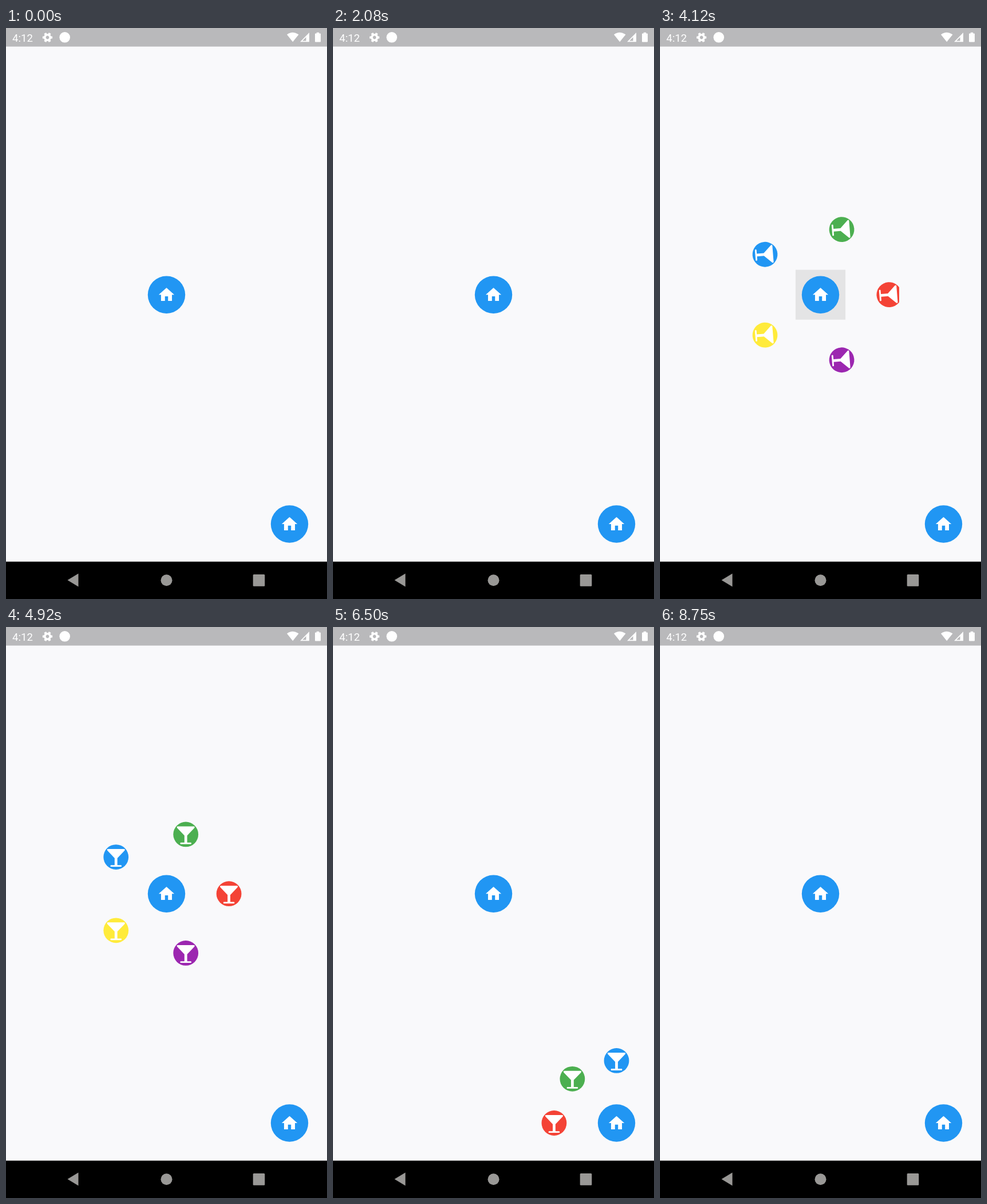
These frames come from a looping animation (561 by 998 pixels, 8790 ms). An HTML page:

```html
<!DOCTYPE html>
<html lang="en">
<head>
<meta charset="utf-8">
<title>Radial menus</title>
<style>
html, body { margin: 0; width: 100%; height: 100%; overflow: hidden; background: #f9f9fb; }
svg { display: block; width: 561px; height: 998px; }
text { font: 18.6px Roboto, Arial, sans-serif; fill: #fff; }
</style>
</head>
<body>
<svg viewBox="0 0 561 998">
  <defs>
    <clipPath id="box"><rect x="-137.5" y="-137.5" width="275" height="275"/></clipPath>
    <path id="house" fill="#fff" transform="scale(1.364) translate(-12 -12)" d="M10 20v-6h4v6h5v-8h3L12 3 2 12h3v8z"/>
    <path id="glass" fill="#fff" d="M-14.8-14H14.8Q16.4-13 15-11.2L2.4 2V14.2H9.2Q10.6 15.6 9.2 17H-9.2Q-10.6 15.6-9.2 14.2H-2.4V2L-15-11.2Q-16.4-13-14.8-14Z"/>
    <rect id="tooth" x="-2.1" y="-8.6" width="4.2" height="5" rx=".6"/>
  </defs>
  <rect width="561" height="998" fill="#f9f9fb"/>
  <g id="menus"></g>

  <rect width="561" height="32.5" fill="#b9b9bb"/>
  <text x="11" y="23.5">4:12</text>
  <g fill="#fff">
    <g id="gear" transform="translate(72.5 16.5)">
      <circle r="4.7" fill="none" stroke="#fff" stroke-width="3.6"/>
    </g>
    <circle cx="102.7" cy="16.3" r="9.3"/>
    <path d="M491 11.5Q501 4 511.5 11.5L501.200 24.300Z"/>
    <path fill-rule="evenodd" d="M514 24.300L530 8V24.300ZM518 22.600H524.500V16Z"/>
    <path d="M540 10.500Q540 9.500 541 9.500H542.800V7.800H547.200V9.500H549Q550 9.500 550 10.500V23.500Q550 24.500 549 24.500H541Q540 24.500 540 23.500Z"/>
  </g>

  <rect y="932.7" width="561" height="65.300"/>
  <g fill="#999896">
    <path d="M107.500 965L126.500 953.500V976.500Z"/>
    <circle cx="280.500" cy="965.300" r="10"/>
    <rect x="431.700" y="955" width="20.600" height="20.800" rx="1.500"/>
  </g>
</svg>
<script>
const LOOP = 8790, SPAN = 500, RADIUS = 109.1;
const RED = '#f44336', GREEN = '#4caf50', BLUE = '#2196f3', YELLOW = '#ffeb3b', PURPLE = '#9c27b0';

// press rows: fade-in start, fade-in end, fade-out start, fade-out end, strength
const menus = [
  { x: 280.5, y: 466.2, clip: true, open: 4064, close: 5290,
    items: [[RED, 0], [PURPLE, 72], [YELLOW, 144], [BLUE, 216], [GREEN, 288]],
    press: [[3940, 4060, 4190, 4390, .085], [5040, 5120, 5330, 5530, .065]] },
  { x: 495.5, y: 867, clip: false, open: 5920, close: 7250,
    items: [[RED, 180], [GREEN, 225], [BLUE, 270]],
    press: [[5740, 5860, 6040, 6240, .08], [7000, 7080, 7330, 7530, .065]] }
];

const clamp = v => Math.min(1, Math.max(0, v));
const elasticOut = t => t <= 0 ? 0 : t >= 1 ? 1 :
  1 + 2 ** (-10 * t) * Math.sin((t - .1) * Math.PI * 5);
const decelerate = t => 1 - (1 - t) ** 2;

function add(parent, tag, attrs) {
  const node = document.createElementNS('http://www.w3.org/2000/svg', tag);
  for (const key in attrs) node.setAttribute(key, attrs[key]);
  return parent.appendChild(node);
}

const gear = document.getElementById('gear');
for (let a = 0; a < 360; a += 60) add(gear, 'use', { href: '#tooth', transform: `rotate(${a + 30})` });

for (const m of menus) {
  const root = add(document.getElementById('menus'), 'g', { transform: `translate(${m.x} ${m.y})` });
  m.ring = add(root, 'g', m.clip ? { 'clip-path': 'url(#box)' } : {});
  m.nodes = m.items.map(([color]) => {
    const g = add(m.ring, 'g', {});
    add(g, 'circle', { r: 21.9, fill: color });
    add(g, 'use', { href: '#glass' });
    return g;
  });
  m.shade = add(root, 'rect', { x: -43.6, y: -43.6, width: 87.2, height: 87.2 });
  add(root, 'circle', { r: 32.7, fill: BLUE });
  add(root, 'use', { href: '#house' });
}

function draw(time) {
  for (const m of menus) {
    const t = time < m.close ? clamp((time - m.open) / SPAN) : 1 - clamp((time - m.close) / SPAN);
    const dist = RADIUS * elasticOut(t);
    const turn = 360 * decelerate(clamp(t / .9));
    m.ring.setAttribute('visibility', t > 0 ? 'visible' : 'hidden');
    m.nodes.forEach((node, i) => {
      const a = m.items[i][1] * Math.PI / 180;
      node.setAttribute('transform',
        `translate(${dist * Math.cos(a)} ${dist * Math.sin(a)}) rotate(${turn})`);
    });
    const shade = m.press.reduce((sum, [a, b, c, d, k]) =>
      sum + k * clamp((time - a) / (b - a)) * clamp((d - time) / (d - c)), 0);
    m.shade.setAttribute('fill-opacity', shade);
  }
}

const start = performance.now();
function tick() {
  draw((performance.now() - start) % LOOP);
  requestAnimationFrame(tick);
}
draw(0);
requestAnimationFrame(tick);
</script>
</body>
</html>
```
